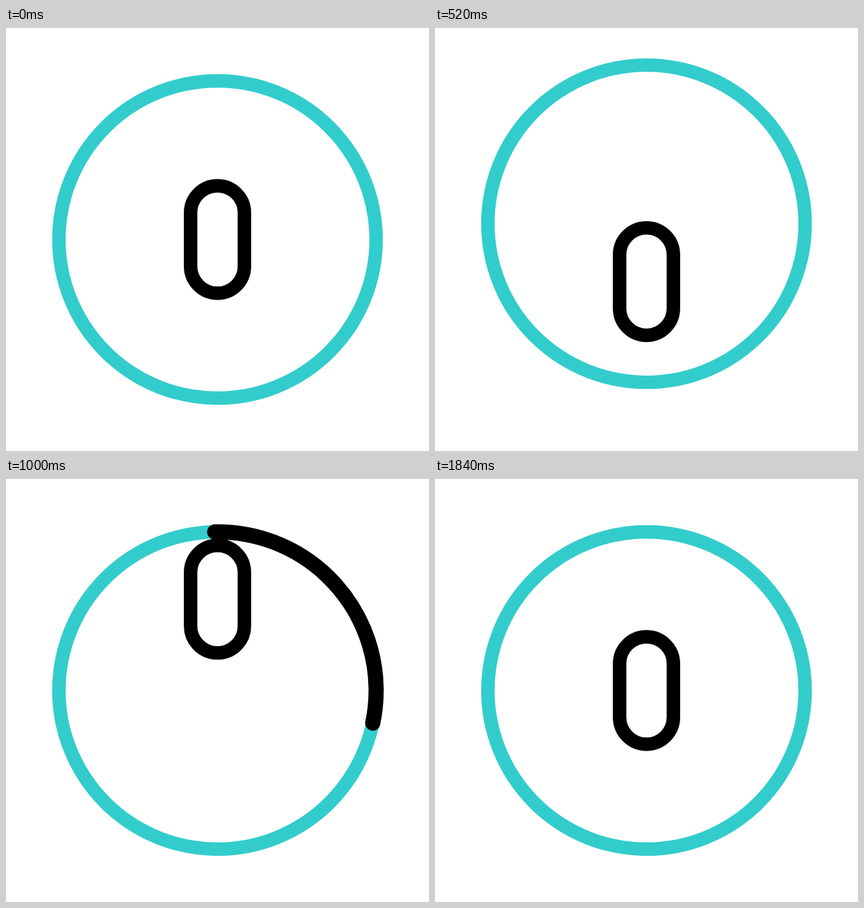
Recreate the animation shown at these times as an HTML page. Size 640x640 px, loop 2000 ms.

```html
<!DOCTYPE html>
<html lang="en">
<head>
<meta charset="utf-8">
<title>Bouncing zero in a ring</title>
<style>
  html, body { margin: 0; height: 100%; overflow: hidden; background: #fff; }
  svg { display: block; width: 100%; height: 100%; }
</style>
</head>
<body>
<svg viewBox="0 0 640 640" fill="none" stroke-width="20.4">
  <circle id="ring" cx="320" cy="320" r="240" stroke="#33cccc"/>
  <rect id="digit" x="279.3" y="238.7" width="81.4" height="162.6" rx="40.7" stroke="#000"/>
  <circle id="sweep" cx="320" cy="320" r="240" stroke="#000" stroke-width="23"
    stroke-linecap="round" pathLength="1" transform="rotate(-91 320 320)"/>
</svg>
<script>
const LOOP = 2000, STEP = 40;
const [ring, digit, sweep] = ['ring', 'digit', 'sweep'].map(id => document.getElementById(id));

// Keyframes are [time in ms, value], eased in and out between neighbours.
const ringY = [[120, 0], [360, 33.6], [560, -30.6], [760, 0]];
const digitY = [[120, 0], [440, 63.7], [520, 63.7], [1000, -138.2], [1240, 0]];
const sweepHead = [[760, 0], [1440, 1]];
const sweepTail = [[1040, 0], [1840, 1]];

const smooth = s => s * s * (3 - 2 * s);

function valueAt(keys, t) {
  if (t <= keys[0][0]) return keys[0][1];
  const next = keys.findIndex(([time]) => time > t);
  if (next < 0) return keys[keys.length - 1][1];
  const [t0, v0] = keys[next - 1], [t1, v1] = keys[next];
  return v0 + (v1 - v0) * smooth((t - t0) / (t1 - t0));
}

function draw(t) {
  ring.setAttribute('transform', `translate(0 ${valueAt(ringY, t)})`);
  digit.setAttribute('transform', `translate(0 ${valueAt(digitY, t)})`);
  const tail = valueAt(sweepTail, t);
  const length = valueAt(sweepHead, t) - tail;
  sweep.setAttribute('visibility', length > 0 ? 'visible' : 'hidden');
  sweep.setAttribute('stroke-dasharray', `${length} 2`);
  sweep.setAttribute('stroke-dashoffset', -tail);
}

function tick() {
  const t = performance.now() % LOOP;
  draw(Math.floor(t / STEP) * STEP);
  requestAnimationFrame(tick);
}
tick();
</script>
</body>
</html>
```
